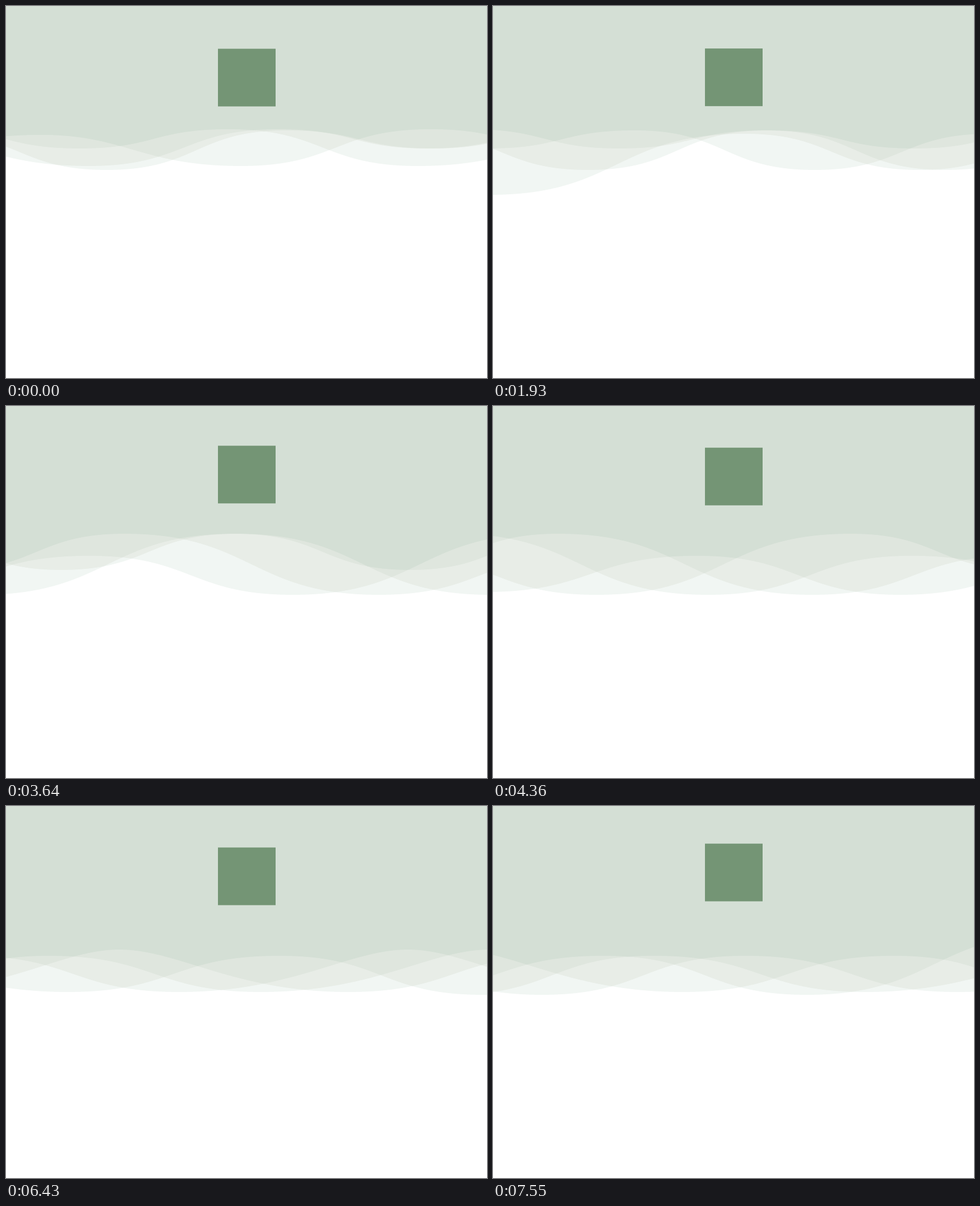
Animation of 851x658 px, one loop 7.68 s. Source, as an HTML page with a canvas:

```html
<!DOCTYPE html>
<html lang="en">
<head>
<meta charset="utf-8">
<title>Waves</title>
<style>
  html, body { margin: 0; width: 100%; height: 100%; overflow: hidden; background: #fff; }
  canvas { display: block; }
</style>
</head>
<body>
<canvas id="stage" width="851" height="658"></canvas>
<script>
const W = 851, H = 658;
const LOOP = 7680, STEP = 1000 / 14, LAST = 7550, TURN = 6537;
const ctx = document.getElementById('stage').getContext('2d');

// Fill by number of overlapping bands, lightest (one band) first.
const TINTS = ['#f1f6f3', '#e8ede7', '#dfe6de', '#d4dfd5'];

// Crests and troughs of the shared profile: position, height, handle share.
const KNOTS = [
  [-2640, 262, .5], [-2288, 228, .42], [-1935, 283, .5], [-1600, 218, .5],
  [-1337, 252, .5], [-1078, 220, .5], [-760, 290, .5], [-450, 226, .5],
  [0, 334, .5], [360, 265, .5], [735, 329, .5], [1140, 254, .26],
  [1540, 330, .5], [1900, 265, .5]
];

// Bands: place of the deepest trough at time 0, and speed in px per second.
const BANDS = [
  { x: 2082, v: -390.6 },
  { x: -1207, v: 319 },
  { x: 2351, v: -410 },
  { x: -582, v: 299 }
];

const FIRST = KNOTS[0][0];
const profile = buildProfile();

// Cubic with level tangents at each knot, sampled at whole pixels.
function buildProfile() {
  const out = [];
  for (let i = 0; i < KNOTS.length - 1; i++) {
    const [x0, y0, a] = KNOTS[i], [x1, y1, b] = KNOTS[i + 1];
    const len = x1 - x0;
    for (let x = 0; x < len; x++) {
      let lo = 0, hi = 1;
      for (let n = 0; n < 20; n++) {
        const t = (lo + hi) / 2, r = 1 - t;
        const p = 3 * r * r * t * a + 3 * r * t * t * (1 - b) + t * t * t;
        if (p * len < x) lo = t; else hi = t;
      }
      out.push(y0 + (y1 - y0) * lo * lo * (3 - 2 * lo));
    }
  }
  return out;
}

function heightAt(s) {
  const p = Math.max(0, Math.min(profile.length - 2, s - FIRST));
  const i = Math.floor(p);
  return profile[i] + (profile[i + 1] - profile[i]) * (p - i);
}

function drawWaves(ms) {
  const sec = (ms < TURN ? ms : 2 * TURN - ms) / 1000;
  const columns = [];
  for (let x = 0; x <= W; x++) {
    const ys = BANDS.map(b => heightAt((b.x + b.v * sec - x) * Math.sign(b.v)));
    columns.push(ys.sort((p, q) => q - p));
  }
  TINTS.forEach((tint, k) => {
    ctx.fillStyle = tint;
    ctx.beginPath();
    ctx.moveTo(0, 0);
    columns.forEach((ys, x) => ctx.lineTo(x, ys[k]));
    ctx.lineTo(W, 0);
    ctx.fill();
  });
}

function drawBadge(ms) {
  ctx.fillStyle = '#749575';
  ctx.fillRect(375, 69.2 + 6.4 * Math.cos(2 * Math.PI * ms / 2050), 102, 102);
}

function draw(ms) {
  ctx.fillStyle = '#fff';
  ctx.fillRect(0, 0, W, H);
  drawWaves(ms);
  drawBadge(ms);
}

function stepTime(t) {
  return t >= LAST - 5 ? LAST : Math.min(104, Math.floor((t + 6) / STEP)) * STEP;
}

const start = performance.now();
function tick() {
  draw(stepTime((performance.now() - start) % LOOP));
  requestAnimationFrame(tick);
}
tick();
</script>
</body>
</html>
```
